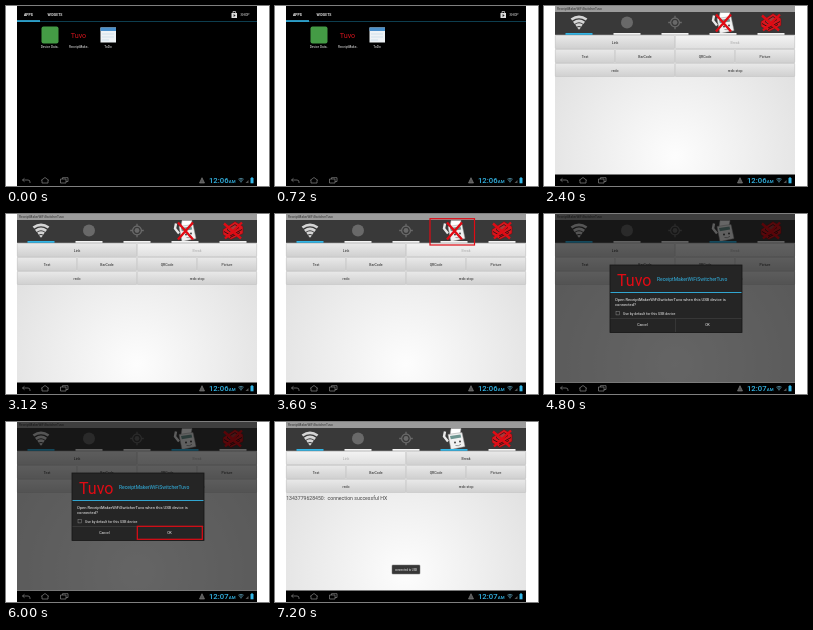
Animation, 263 px wide and 180 px high, one loop 8000 ms. Source, as an HTML page:

```html
<!DOCTYPE html>
<html lang="en">
<head>
<meta charset="utf-8">
<style>
  html, body { margin: 0; width: 100%; height: 100%; overflow: hidden; background: #fff; }
  svg { display: block; width: 100vw; height: 100vh; font-family: Roboto, sans-serif; }
</style>
</head>
<body>
<svg id="stage" viewBox="0 0 263 180"></svg>
<script>
const BLUE = '#33b5e5', RED = '#e00b14';
const APP = 'Tuvo', TITLE = 'ReceiptMakerWiFiSwitcherTuvo';

const rect = (x, y, w, h, fill, extra = '') =>
  `<rect x="${x}" y="${y}" width="${w}" height="${h}" fill="${fill}" ${extra}/>`;
const path = (d, stroke, width = 1, fill = 'none', extra = '') =>
  `<path d="${d}" stroke="${stroke}" stroke-width="${width}" fill="${fill}" ${extra}/>`;
const text = (x, y, size, fill, label, anchor = 'middle', extra = '') =>
  `<text x="${x}" y="${y}" font-size="${size}" fill="${fill}" text-anchor="${anchor}" ${extra}>${label}</text>`;
const group = (id, body) => `<g id="${id}">${body}</g>`;
const at = (x, y, body, scale = 1) => `<g transform="translate(${x} ${y}) scale(${scale})">${body}</g>`;

const wifi = (color) => path('M-7.6-3Q0-8.4 7.6-3M-5.2.3Q0-3.6 5.2.3M-3 3.2Q0 1.2 3 3.2', color, 2.7) +
  path('M-1.9 5Q0 3.8 1.9 5L0 7.2Z', 'none', 0, color);
const target = `<circle r="4.4" fill="none" stroke="#696969" stroke-width="1.3"/><circle r="2.4" fill="#696969"/>` +
  path('M0-6.8V-4M0 4V6.8M-6.8 0H-4M4 0H6.8', '#696969', 1.3);
const cross = path('M-7-8L8 9M8-8L-7 9', RED, 2.4);

const whitePrinter = path('M-6 3L-10-2L-9-7', '#e8e8e8', 2.4) +
  path('M-4-3L-3-10L7-10L6-4Z', '#aaa', .5, '#fff') +
  path('M-6-4L8-6L11 8L-3 11Z', '#999', .5, '#f1f1f1') +
  path('M-4-2.5L6.5-4L7.2-1L-3.2.8Z', 'none', 0, '#6d9590') +
  `<circle cx="1" cy="4" r=".9" fill="#333"/><circle cx="6" cy="3" r=".9" fill="#333"/>` +
  path('M1.5 7Q4.5 8 7 5.8', '#777', .7);
const redPrinter = path('M-10-1L2-9L10-4L10 3L-2 9L-10 4Z', '#6d1014', .6, '#d8161d') +
  path('M-6-1L2-6L6-3L-2 2Z', '#3c1012', .8, '#a83a3a') +
  path('M-9 1L-2 5L9-1M-3 7L7 2', '#3c1012', 1) +
  path('M-9-7L8 8M9-8L-8 8', RED, 2.4);

function launcher() {
  const labels = [[44, 'Device Data..'], [73, 'ReceiptMake..'], [102, 'ToDo']];
  return rect(11, 0, 240, 169, '#000') +
    text(22.5, 10.3, 3.5, '#fff', 'APPS', 'middle', 'font-weight="700"') +
    text(49, 10.3, 3.5, '#ddd', 'WIDGETS', 'middle', 'font-weight="700"') +
    rect(11, 15.2, 240, .6, '#176783') + rect(11, 14.2, 23, 1.6, BLUE) +
    rect(225.5, 7, 5.5, 5, '#ddd') + path('M227 7V5.5H229.6V7', '#ddd', .7) + path('M227.6 8L229.6 9.5L227.6 11Z', 'none', 0, '#222') +
    text(239, 10.3, 3.5, '#ddd', 'SHOP') +
    rect(35.5, 20.5, 17, 17, '#449b45', 'rx="2"') +
    text(72.5, 32, 7.2, '#d0141c', APP) +
    rect(94.5, 21.5, 15.5, 15, '#eef3f6') + rect(94.5, 21.5, 15.5, 3.5, '#4a90cb') +
    path('M96 28H108M96 31H108M96 34H103', '#bed4e2', .6) +
    labels.map(([x, label]) => text(x, 42.2, 3.2, '#eee', label)).join('');
}

const button = (x, y, w, label, id = '') => group(id || label,
  rect(x + .3, y, w - .6, 13, 'url(#key)', 'stroke="#bebebe" stroke-width=".5" rx=".5"') +
  text(x + w / 2, y + 8, 3.5, '#222', label));

function printerApp() {
  const icons = [wifi('#d5d5d5'), '<circle r="6" fill="#696969"/>', target, whitePrinter, redPrinter];
  return rect(11, 0, 240, 169, 'url(#page)') +
    rect(11, 0, 240, 6, '#9b9b9b') + text(13, 4.3, 3.2, '#333', TITLE, 'start') +
    rect(11, 6, 240, 22.8, '#393939') +
    icons.map((icon, i) => at(35 + 48 * i, 16.5, icon) +
      rect(21.5 + 48 * i, 27, 27, 1.8, i ? '#f4f4f4' : BLUE, `id="tab${i}"`)).join('') +
    group('cross', at(179, 16.5, cross)) +
    button(11, 29.5, 120, 'Link') + button(131, 29.5, 120, 'Break') +
    ['Text', 'BarCode', 'QRCode', 'Picture'].map((label, i) => button(11 + 60 * i, 43.5, 60, label)).join('') +
    button(11, 57.5, 120, 'redo') + button(131, 57.5, 120, 'redo stop', 'redoStop');
}

function dialog() {
  return rect(11, 0, 240, 168, '#000', 'opacity=".6"') +
    rect(66, 51, 132, 67.5, '#252525', 'stroke="#161616" stroke-width=".8"') +
    text(73, 71.5, 16, RED, APP, 'start') +
    text(113, 66.8, 5, BLUE, TITLE, 'start') +
    rect(66.5, 78, 131, .9, BLUE) +
    text(71, 87, 4.05, '#f2f2f2', `Open ${TITLE} when this USB device is`, 'start') +
    text(71, 92.3, 4.05, '#f2f2f2', 'connected?', 'start') +
    rect(72, 97.4, 3.5, 3.5, 'none', 'stroke="#888" stroke-width=".5"') +
    text(79, 100.7, 3.5, '#eee', 'Use by default for this USB device', 'start') +
    path('M66.5 104.5H197.5M131.5 104.5V118', '#484848', .5) +
    text(98.5, 111.8, 3.5, '#eee', 'Cancel') + text(163.5, 111.8, 3.5, '#eee', 'OK');
}

function systemBar() {
  return rect(11, 168.5, 240, 11.5, '#000') +
    path('M18.5 172.3L16.5 174L18.5 175.7M16.5 174H22Q24 174 24 176V177', '#777', .8) +
    path('M35 174.5L39 171.5L43 174.5M36 174.2V177H42V174.2', '#777', .8) +
    path('M54.5 173H60V177H54.5ZM56.5 173V171.7H62V175.5H60', '#777', .8) +
    path('M196 171.7L198.5 177H193.5Z', '#888', .6, '#555') +
    text(203, 177.3, 7.7, BLUE, '', 'start', 'id="clock" font-weight="500"') +
    text(222.8, 177.3, 4.4, BLUE, 'AM', 'start', 'font-weight="500"') +
    at(235, 174.3, wifi('#4b7f92'), .35) +
    path('M239.5 177L242.5 174V177Z', 'none', 0, '#555') +
    rect(244.5, 172, 3, 5.3, BLUE) + rect(245.3, 171.2, 1.4, .8, BLUE);
}

const outline = `fill="none" stroke="${RED}" stroke-width="1.2"`;
const shade = (top, bottom) => `<stop stop-color="${top}"/><stop offset="1" stop-color="${bottom}"/>`;
const stage = document.getElementById('stage');
stage.innerHTML = `<defs>
  <radialGradient id="page" gradientUnits="userSpaceOnUse" cx="131" cy="150" r="150">${shade('#fdfdfd', '#e0e0e0')}</radialGradient>
  <linearGradient id="key" x2="0" y2="1">${shade('#e9e9e9', '#d0d0d0')}</linearGradient>
  <linearGradient id="keyOff" x2="0" y2="1">${shade('#f3f3f3', '#dfdfdf')}</linearGradient>
</defs>` +
  group('home', launcher()) +
  group('circled', `<ellipse cx="73.7" cy="33" rx="18.5" ry="13" ${outline}/>`) +
  group('printer', printerApp()) +
  group('boxed', `<rect x="155" y="4.7" width="44.5" height="26.3" ${outline}/>`) +
  group('dialog', dialog()) +
  group('confirm', `<rect x="131.3" y="104.3" width="65" height="13" ${outline}/>`) +
  group('result', text(11.2, 77.6, 5.15, '#444', '1343779628450:&#160; connection successful HX', 'start') +
    rect(117, 143, 28, 9, '#373737', 'rx=".8" stroke="#777" stroke-width=".5"') +
    text(131, 148.5, 2.8, '#eee', 'connected to USB')) +
  systemBar();

const $ = (id) => document.getElementById(id);
const show = (id, on) => $(id).style.display = on ? '' : 'none';

function enable(id, on) {
  const [key, label] = $(id).children;
  key.setAttribute('fill', on ? 'url(#key)' : 'url(#keyOff)');
  label.setAttribute('fill', on ? '#222' : '#aaa');
}

function draw(ms) {
  const scene = Math.floor(ms % 8000 / 1200);
  const plugged = scene > 3, linked = scene === 6;
  show('home', scene < 2);
  show('circled', scene === 1);
  show('printer', scene > 1);
  show('boxed', scene === 3);
  show('dialog', plugged && !linked);
  show('confirm', scene === 5);
  show('result', linked);
  show('cross', !plugged);
  $('tab3').setAttribute('fill', plugged ? BLUE : '#f4f4f4');
  enable('Link', !linked);
  enable('Break', linked);
  $('clock').textContent = plugged ? '12:07' : '12:06';
}

const start = performance.now();
function tick() {
  draw(performance.now() - start);
  requestAnimationFrame(tick);
}
tick();
</script>
</body>
</html>
```
